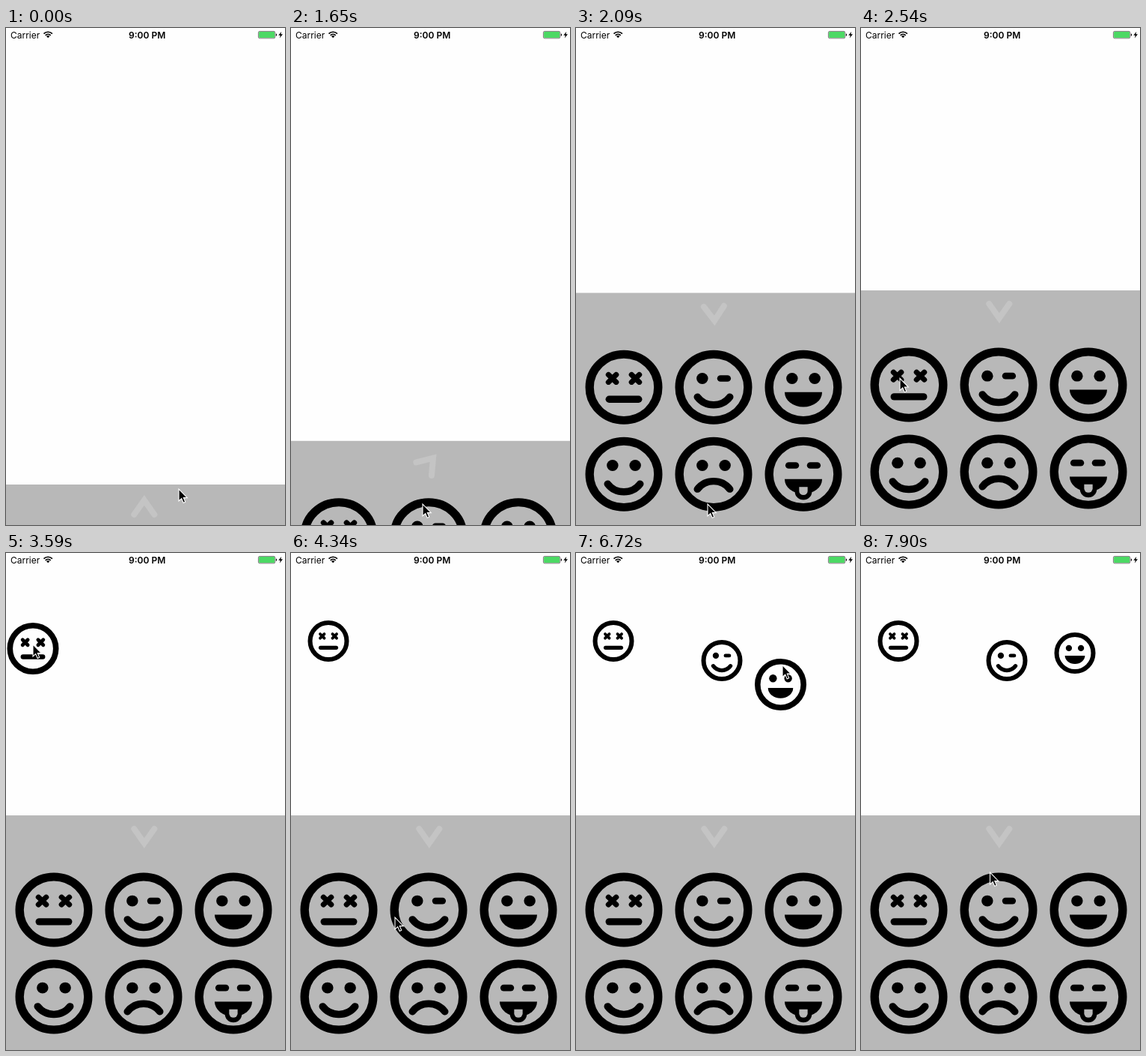
These frames come from a looping animation (373x663 px, 8 s). An HTML page:

```html
<!DOCTYPE html>
<html lang="en">
<head>
<meta charset="utf-8">
<title>Emoji tray</title>
<style>
html, body { margin: 0; height: 100%; overflow: hidden; background: #fefefe; }
svg { display: block; width: 100vw; height: 100vh; }
text { font: 12px Inter, "Liberation Sans", sans-serif; }
.line { fill: none; stroke: #000; stroke-width: 9.5; stroke-linecap: round; }
</style>
</head>
<body>
<svg viewBox="0 0 373 663">
  <defs>
    <circle id="ring" r="44.5" class="line" style="stroke-width:11"/>
    <circle id="eye" cx="-14.7" cy="-12" r="7.5"/>
    <g id="eyes"><use href="#eye"/><use href="#eye" x="29.4"/></g>
    <path id="smile" d="M-21 13A26 26 0 0 0 21 13" class="line"/>
    <path id="laugh" d="M-24.3 6.5H24.3A24.3 20 0 0 1-24.3 6.5Z"/>
    <path id="cross" d="M-20-17l10 10m0-10l-10 10" class="line" style="stroke-width:7"/>
    <path id="dash" d="M9-12H18" class="line" style="stroke-width:8.8"/>
    <g id="dead">
      <use href="#ring"/><use href="#cross"/><use href="#cross" x="30"/>
      <path d="M-19 16H19" class="line"/>
    </g>
    <g id="wink"><use href="#ring"/><use href="#eye"/><use href="#dash"/><use href="#smile"/></g>
    <g id="grin"><use href="#ring"/><use href="#eyes"/><use href="#laugh"/></g>
    <g id="happy"><use href="#ring"/><use href="#eyes"/><use href="#smile"/></g>
    <g id="sad">
      <use href="#ring"/><use href="#eyes"/>
      <path d="M-21 20A26 26 0 0 1 21 20" class="line"/>
    </g>
    <g id="tongue">
      <use href="#ring"/><use href="#dash"/><use href="#dash" x="-28"/><use href="#laugh"/>
      <path d="M-11 14V23.5a11 11 0 0 0 22 0V14Z"/>
      <path d="M-5.5 17H5.5V22.5a5.5 5.5 0 0 1-11 0Z" fill="#b8b8b8"/>
    </g>
  </defs>

  <text x="6" y="13.7">Carrier</text>
  <g transform="translate(56.2 13.3)">
    <path d="M0 0L-2.2-2.2A3.1 3.1 0 0 1 2.2-2.2Z"/>
    <path d="M-3.5-3.5A4.95 4.95 0 0 1 3.5-3.5M-5.7-5.7A8.05 8.05 0 0 1 5.7-5.7" fill="none" stroke="#000" stroke-width="1.7"/>
  </g>
  <text x="188.7" y="13.7" text-anchor="middle" style="font-weight:600">9:00 PM</text>
  <rect x="337.4" y="4.4" width="22.4" height="9.4" rx="1.8" fill="none" stroke="#444" stroke-width=".7"/>
  <rect x="338.1" y="5.1" width="21" height="8" rx="1" fill="#4cd964"/>
  <path d="M360.8 7.2a2 2 0 0 1 0 3.8Z"/>
  <path d="M368.3 4.8L364.3 9.8H366.8L365.8 13.4L370 8.2H367.4Z"/>

  <g id="tray">
    <rect width="373" height="663" fill="#b8b8b8"/>
    <path id="arrow" d="M-13.5 11L0-8L13.5 11" fill="none" stroke="#c4c4c4" stroke-width="8" stroke-linecap="round"/>
  </g>
  <g id="dropped"></g>
  <path id="cursor" d="M0 0V16L3.7 12.6L6.2 18.4L8.7 17.3L6.3 11.6H11.3Z" stroke="#fff" stroke-width="1.1"/>
</svg>
<script>
const LOOP = 8000, TICK = 148.9;   // the screen refreshes once per tick
const $ = id => document.getElementById(id);
const place = (el, x, y, rest = '') => el.setAttribute('transform', `translate(${x} ${y}) ${rest}`);

function addFace(parent, kind) {
  const el = document.createElementNS('http://www.w3.org/2000/svg', 'use');
  el.setAttribute('href', '#' + kind);
  return parent.appendChild(el);
}

['dead', 'wink', 'grin', 'happy', 'sad', 'tongue'].forEach((kind, i) =>
  place(addFace($('tray'), kind), 64 + i % 3 * 120, 126 + (i > 2) * 116, 'scale(1.03 .99)'));

// where the pointer comes to rest or turns: tick, x, y
const stops = [
  [1, 231, 615], [4, 176, 635], [14, 176, 635], [18, 48, 462],
  [23, 49, 470], [24, 36, 122], [26, 50, 112],
  [29, 139, 486], [33, 168, 486], [36, 194, 141.5],
  [41, 292, 470], [45, 276, 149.5], [46, 288.5, 107.5], [53, 172.5, 426]
];
const easeOut = u => 1 - (1 - u) ** 2.5;

function pointer(n) {
  const i = stops.findIndex(s => s[0] >= n);
  const [b, ...to] = stops[i], [a, ...from] = stops[Math.max(0, i - 1)];
  const u = a === b ? 1 : easeOut((n - a) / (b - a));
  return from.map((v, k) => v + (to[k] - v) * u);
}

// ticks of grab and drop, time held before shrinking, offset from the pointer
const drags = [
  { kind: 'dead', grab: 23, drop: 26, hold: 1, dx: 0, dy: 5.5 },
  { kind: 'wink', grab: 34, drop: 36, hold: 1, dx: 1, dy: 2 },
  { kind: 'grin', grab: 42, drop: 46, hold: 2, dx: -2.5, dy: 26 }
];
for (const d of drags) d.el = addFace($('dropped'), d.kind);

// damped spring from 0 to 1, damping ratio 0.5
function spring(ms) {
  const a = Math.max(0, ms) * .01745, b = a * Math.sqrt(.75);
  return 1 - Math.exp(-a / 2) * (Math.cos(b) + Math.sin(b) / Math.sqrt(3));
}

function draw(now) {
  const n = Math.floor(now % LOOP / TICK);
  const open = spring((n - 11) * TICK + 44.4);
  place($('tray'), 0, 609 - 259 * open);
  place($('arrow'), 184.8, 29, `rotate(${180 * open})`);
  place($('cursor'), ...pointer(n));
  for (const d of drags) {
    const [x, y] = pointer(Math.min(n, d.drop));
    d.el.style.display = n < d.grab ? 'none' : '';
    place(d.el, x + d.dx, y + d.dy, `scale(${n < d.drop + d.hold ? .69 : .55})`);
  }
}

const start = performance.now();
function loop() {
  draw(performance.now() - start);
  requestAnimationFrame(loop);
}
loop();
</script>
</body>
</html>
```
